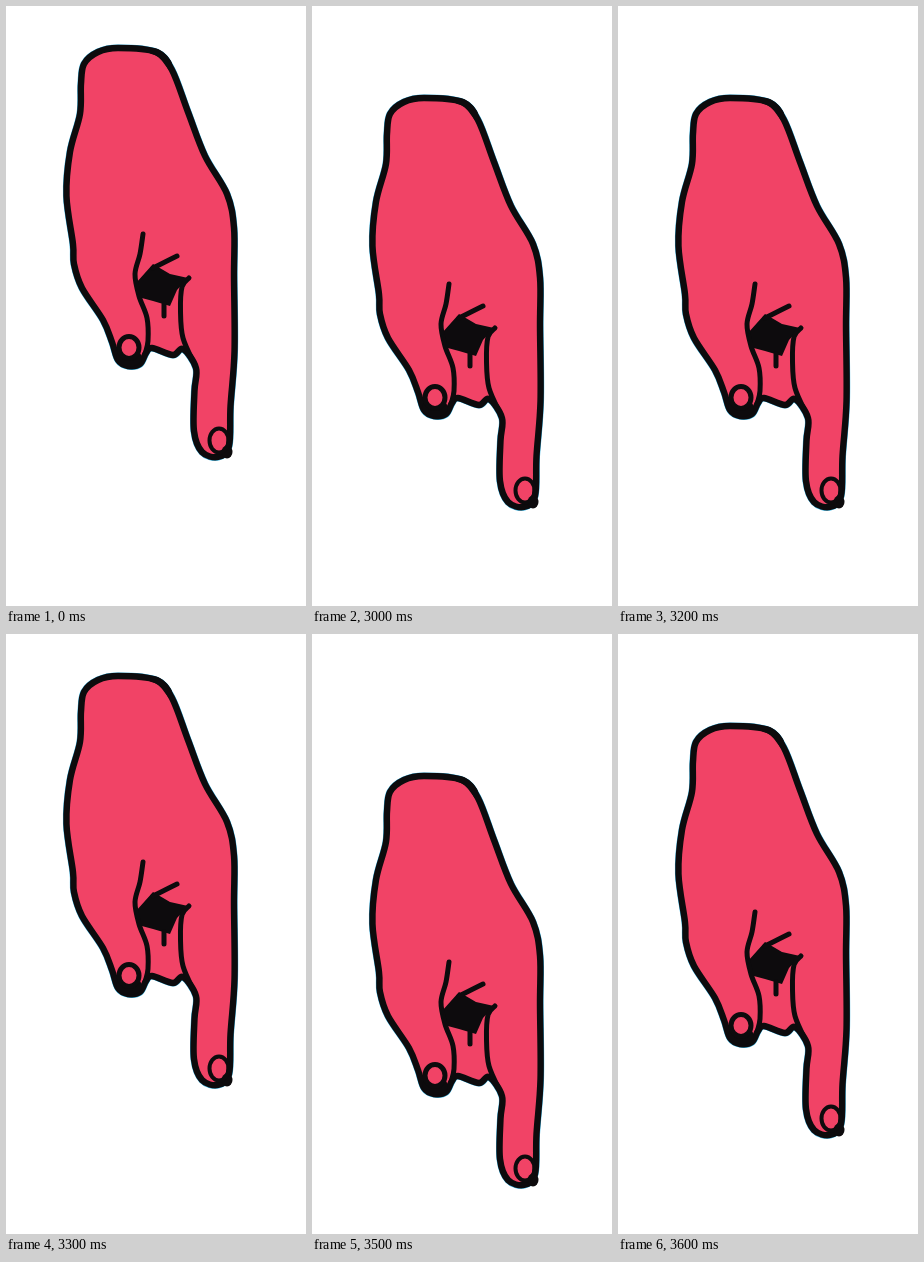
Animation, 300 px wide and 600 px high, one loop 3700 ms. Source, as an HTML page with a canvas:

```html
<!DOCTYPE html>
<html lang="en">
<head>
<meta charset="utf-8">
<title>Pointing hand</title>
<style>
html, body { margin: 0; width: 100%; height: 100%; overflow: hidden; background: #fff; }
canvas { display: block; }
</style>
</head>
<body>
<canvas id="stage" width="300" height="600"></canvas>
<script>
const ctx = document.getElementById('stage').getContext('2d');
const INK = '#0d0b0d', SKIN = '#f14366', EDGE = '#35b4e4';
const REST = 3000, STEP = 100, LOOP = 3700, REACH = 100;

// Smooth path through x,y pairs (Catmull-Rom as Bezier segments)
function spline(p, closed) {
  const n = p.length / 2, path = new Path2D();
  const at = i => {
    const k = closed ? (i + n) % n : Math.max(0, Math.min(n - 1, i));
    return [p[2 * k], p[2 * k + 1]];
  };
  path.moveTo(p[0], p[1]);
  for (let i = 0; i < (closed ? n : n - 1); i++) {
    const [a, b, c, d] = [at(i - 1), at(i), at(i + 1), at(i + 2)];
    path.bezierCurveTo(
      b[0] + (c[0] - a[0]) / 6, b[1] + (c[1] - a[1]) / 6,
      c[0] - (d[0] - b[0]) / 6, c[1] - (d[1] - b[1]) / 6,
      c[0], c[1]);
  }
  if (closed) path.closePath();
  return path;
}

function oval(x, y, rx, ry) {
  const path = new Path2D();
  path.ellipse(x, y, rx, ry, 0, 0, 2 * Math.PI);
  return path;
}

const hand = spline([
  75,78, 78,58, 92,46, 112,42, 150,46, 166,64, 182,106, 199,150, 221,188,
  228,222, 228,270, 228.5,345, 224.5,400, 223,440, 212,451, 196,446,
  188,425, 188.5,385, 190,362, 177,343, 167,349, 146,342, 140,347,
  134,358, 122,360, 112,354, 106,336, 97,314, 76,282, 68,258, 67,238,
  60.5,190, 64,146, 74,108
], true);

const wrist = spline([134,43, 152,51, 165,66, 165,55, 152,43], true);
const crease = spline([137,228, 134,248, 129,268, 133,290, 141,312, 142,335, 139,348]);
const palm = new Path2D('M130 277L147 258L164 268L182 272L171 284L164 300L147 295L132 291Z');
const knuckle = spline([171,250, 159,256, 147,262]);
const finger = spline([183,272, 176,281, 174.5,305, 177,332, 189,359]);
const drip = spline([158,298, 158,310]);
const thumbTip = oval(123, 352, 13, 9);
const thumbNail = oval(123, 341.5, 10, 11);
const fingerTip = oval(221, 446, 5.5, 6.5);
const fingerNail = oval(213, 434.5, 9.5, 12);

function stroke(path, width, color = INK) {
  ctx.lineWidth = width;
  ctx.strokeStyle = color;
  ctx.stroke(path);
}

function fill(path, color = INK) {
  ctx.fillStyle = color;
  ctx.fill(path);
}

function drawHand(y) {
  fill(new Path2D('M0 0H300V600H0Z'), '#fff');
  ctx.save();
  ctx.translate(0, y);
  ctx.lineCap = ctx.lineJoin = 'round';
  stroke(hand, 7.1, EDGE);
  fill(hand, SKIN);
  stroke(hand, 6.4);
  for (const shape of [wrist, palm, thumbTip, fingerTip]) fill(shape);
  fill(thumbNail, SKIN);
  for (const line of [crease, knuckle, finger, drip, thumbNail]) stroke(line, 5);
  stroke(fingerNail, 4);
  ctx.restore();
}

// The hand rests, then bobs down and up in held steps
function dropAt(t) {
  const step = t < REST ? 0 : Math.floor((t - REST) / STEP) + 1;
  return REACH / 2 * (1 - Math.cos(step * Math.PI / 2));
}

const start = performance.now();
function frame() {
  drawHand(Math.round(dropAt((performance.now() - start) % LOOP)));
  requestAnimationFrame(frame);
}
frame();
</script>
</body>
</html>
```
